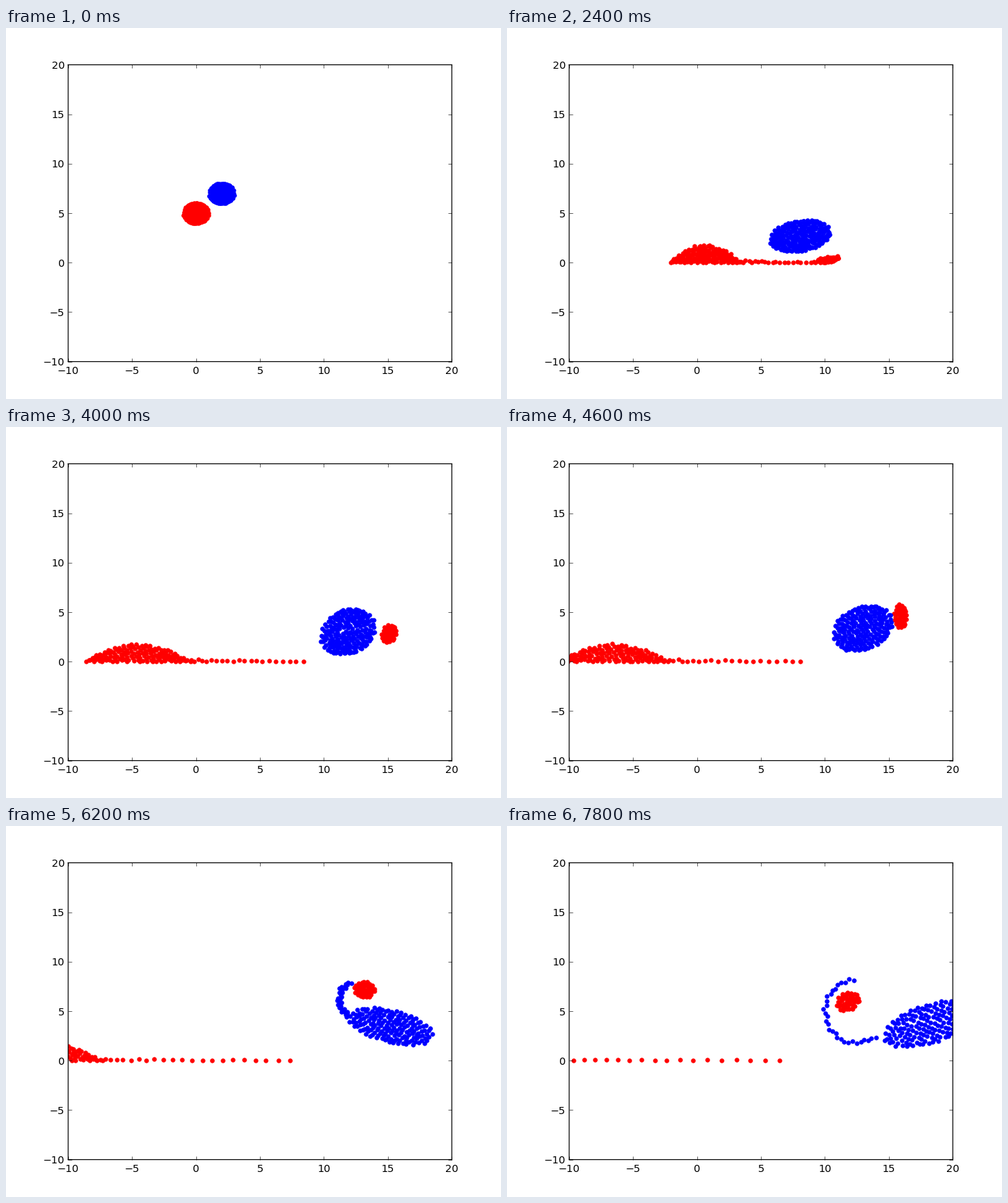
A matplotlib script that plays this animation: 692 px wide and 519 px high, repeating every 8000 ms.

```python
import numpy as np
import matplotlib.pyplot as plt
from matplotlib.animation import FuncAnimation

W, H, DPI = 692, 519, 86.5
FRAMES, STEP = 40, 200
KEYS = np.array([0, 1.0, 2.4, 3.2, 4.6, 6.2, 7.8])   # seconds
N = 197                                              # drops per body
STRING, CLUMP, TAIL = 22, 45, 30                     # drops that leave a body
GOLDEN = (5 ** .5 - 1) / 2

plt.rcParams.update({
    "font.family": "DejaVu Sans", "font.size": 12,
    "axes.linewidth": 1.0, "axes.unicode_minus": True,
    "savefig.dpi": "figure",
})
for axis, far, pad in (("xtick", "top", 5), ("ytick", "right", 4)):
    plt.rcParams.update({
        f"{axis}.direction": "in", f"{axis}.{far}": True,
        f"{axis}.major.size": 4, f"{axis}.major.width": 0.5,
        f"{axis}.major.pad": pad, f"{axis}.labelsize": 12,
    })


def spread(n):
    """Even cover of a unit disc: column u, and height w within the column."""
    g = np.linspace(-1, 1, 999)
    share = .5 + (g * np.sqrt(1 - g * g) + np.arcsin(g)) / np.pi
    i = np.arange(n)
    u = np.interp((i + .5) / n, share, g)
    w = np.clip(1.12 * (2 * (i * GOLDEN % 1) - 1), -1, 1)
    return u, w


def oval(n, cx, cy, a, b, shear=0):
    u, w = spread(n)
    return np.column_stack([cx + a * u,
                            cy + shear * u + b * w * np.sqrt(1 - u * u)])


def arc(n, cx, cy, rx, ry, start, end, thick):
    ang = np.radians(np.linspace(start, end, n))
    r = 1 + thick * spread(n)[1]
    return np.column_stack([cx + rx * r * np.cos(ang), cy + ry * r * np.sin(ang)])


def puddle(t):
    """Dome sliding left on the floor, with a string of drops left behind."""
    s = t - KEYS[2]
    c, r = .6 - 3.25 * s, 4.4 - 1.65 * np.exp(-s)
    u, w = spread(N - STRING - CLUMP)
    dome = np.column_stack([c + r * u, 1.75 * (1 - u * u) * (w + 1) / 2])
    q = np.linspace(0, 1, STRING)
    end = 9.2 - .5 * s
    x = c + r + (end - c - r) * q ** 1.3
    y = .25 * (1 - q) * (1 + spread(STRING)[1]) / 2
    return np.vstack([dome, np.column_stack([x, y])])


# Ovals: centre x, centre y, half width, half height, shear
blue = np.array([
    oval(N, 2, 7, 1, 1),
    oval(N, 4.87, 4.13, 1.54, 1.59, -.38),
    oval(N, 8.03, 2.7, 2.45, 1.52, .4),
    oval(N, 10.1, 2.65, 2.15, 1.9),
    oval(N, 12.95, 3.4, 2.35, 2.15, .6),
    np.vstack([arc(TAIL, 12.8, 6.2, 1.6, 2, 120, 235, .12),
               oval(N - TAIL, 15.2, 3.5, 3.3, 1.6, -.9)]),
    np.vstack([arc(TAIL, 12.4, 5, 2.4, 3.2, 95, 308, .05),
               oval(N - TAIL, 18.2, 3.75, 3.7, 1.95, 1.2)]),
])

clump = [(10.2, .3, .95, .25, .15), (12.9, .75, .85, .35, .4),
         (15.9, 4.6, .5, 1.15), (13.15, 7.2, .85, .8), (11.8, 6, .95, .9, .2)]
red = np.array([
    oval(N, 0, 5, 1, 1),
    oval(N, 2.55, 2.2, 1.75, 1.4, -.6),
] + [np.vstack([puddle(t), oval(CLUMP, *shape)])
     for t, shape in zip(KEYS[2:], clump)])

rng = np.random.default_rng(4)
for body in (blue, red):
    body[2:] += rng.uniform(-.07, .07, body[2:].shape)


def place(body, slope, t):
    """Cubic Hermite path through the key poses, kept above the floor."""
    i = min(np.searchsorted(KEYS, t, side="right") - 1, len(KEYS) - 2)
    d = KEYS[i + 1] - KEYS[i]
    q = (t - KEYS[i]) / d
    pos = ((1 + 2 * q) * (1 - q) ** 2 * body[i]
           + q * (1 - q) ** 2 * d * slope[i]
           + q * q * (3 - 2 * q) * body[i + 1]
           + q * q * (q - 1) * d * slope[i + 1])
    pos[:, 1] = np.maximum(pos[:, 1], 0)
    return pos


fig = plt.figure(figsize=(W / DPI, H / DPI), dpi=DPI, facecolor="white")
ax = fig.add_axes([.125 + .43 / W, .1 + .43 / H, .775, .8])
ax.set(xlim=(-10, 20), ylim=(-10, 20),
       xticks=range(-10, 21, 5), yticks=range(-10, 21, 5))
ax.set_axisbelow(False)
for spine in ax.spines.values():
    spine.set_snap(False)

dots = []
for body, color in ((red, "#ff0000"), (blue, "#0000ff")):
    line, = ax.plot([], [], "o", color=color, ms=5.4, mew=0)
    dots.append((line, body, np.gradient(body, KEYS, axis=0)))


def draw(frame):
    for line, body, slope in dots:
        line.set_data(*place(body, slope, frame * STEP / 1000).T)
    return [line for line, *_ in dots]


anim = FuncAnimation(fig, draw, frames=FRAMES, interval=STEP,
                     init_func=lambda: draw(0), repeat=True, repeat_delay=0)
plt.show()
```
